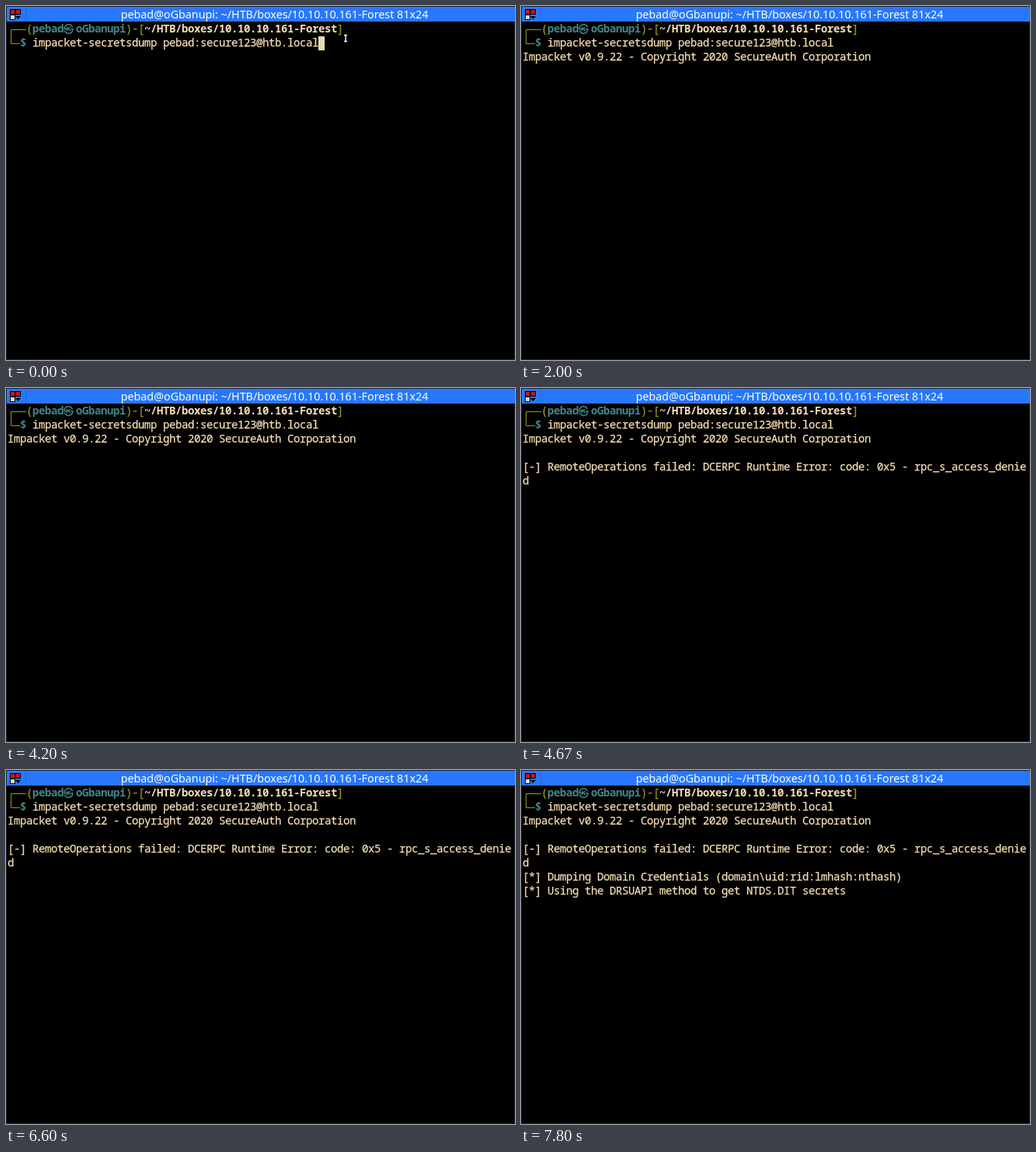
These frames come from a looping animation (655x455 px, 8000 ms). An HTML page:

```html
<!DOCTYPE html>
<html lang="en">
<head>
<meta charset="utf-8">
<title>Terminal session</title>
<style>
  html, body { margin: 0; width: 100%; height: 100%; overflow: hidden; background: #000; }
  svg { display: block; }
  text { white-space: pre; }
  .term {
    font: 500 14px "Noto Sans Mono", "DejaVu Sans Mono", monospace;
    letter-spacing: -.4px;
    color: #f6deb0;
  }
  .term text { fill: currentColor; stroke: currentColor; stroke-width: .25px; }
  .term .bold { font-weight: 700; stroke: none; }
  .term .green { color: #98971a; }
  .term .blue { color: #458588; }
  .term .mark { font: 700 13px "Noto Sans CJK KR", "Noto Sans CJK JP", "Noto Sans CJK", sans-serif; }
  .title { font: 14.3px "Noto Sans", "Open Sans", sans-serif; fill: #fff; text-anchor: middle; }
</style>
</head>
<body>
<svg width="655" height="455">
  <rect x=".5" y=".5" width="654" height="454" fill="#000" stroke="#24242c"/>
  <rect x="1" y="1" width="654" height="19" fill="#2777ff"/>
  <rect x="25" y="1" width="1" height="19" fill="#2068e0"/>
  <g id="groupButton">
    <path d="M5 4h14v7h-7v7h-7z" fill="#000"/>
    <path d="M6 5h5v5h-5zM13 5h5v5h-5z" fill="#d01414"/>
    <path d="M6 12h5v5h-5z" fill="#d8d8d8"/>
    <path d="M12 13h7l-3.5 4z" fill="#000"/>
  </g>
  <text class="title" id="title" x="345.5" y="16"></text>
  <path d="M26 30.5H6.5V48.5H18" fill="none" stroke="#98971a"/>
  <g class="term" id="screen"></g>
  <rect id="cursor" width="8" height="18" fill="#ebdbb2"/>
  <g id="pointer" fill="none">
    <path d="M434.5 37.5h5M437 37.5v8M434.5 45.5h5" stroke="#000" stroke-width="3"/>
    <path d="M435 37.5h4M437 37.5v8M435 45.5h4" stroke="#fff" stroke-width="1.4"/>
  </g>
</svg>
<script>
const LOOP = 8000, BLINK = 600, ENTER = 1200, POINTER_HIDES = 1130;
const CELL_W = 8, CELL_H = 18, LEFT = 2, TOP = 21, BASELINE = 13;
const user = "pebad", host = "oGbanupi", path = "~/HTB/boxes/10.10.10.161-Forest";
const $ = id => document.getElementById(id);
const colX = col => LEFT + col * CELL_W;
const rowY = row => TOP + row * CELL_H;

function print(row, col, string, style = "") {
  const text = document.createElementNS("http://www.w3.org/2000/svg", "text");
  text.setAttribute("x", colX(col));
  text.setAttribute("y", rowY(row) + BASELINE);
  text.setAttribute("class", style);
  text.textContent = string;
  $("screen").append(text);
  return text;
}

$("title").textContent = `${user}@${host}: ${path} 81x24`;

print(0, 3, "(", "green");
print(0, 4, user, "blue bold");
print(0, 9, "㉿", "blue mark");
print(0, 11, host, "blue bold");
print(0, 19, ")-[", "green");
print(0, 22, path, "bold");
print(0, 53, "]", "green");
print(1, 2, "$", "blue bold");
print(1, 4, `impacket-secretsdump ${user}:secure123@htb.local`);

// [time it appears, row, text]
const output = [
  [2000, 2, "Impacket v0.9.22 - Copyright 2020 SecureAuth Corporation"],
  [4670, 4, "[-] RemoteOperations failed: DCERPC Runtime Error: code: 0x5 - rpc_s_access_denie"],
  [4670, 5, "d"],
  [6870, 6, "[*] Dumping Domain Credentials (domain\\uid:rid:lmhash:nthash)"],
  [6870, 7, "[*] Using the DRSUAPI method to get NTDS.DIT secrets"],
].map(([time, row, string]) => ({ time, node: print(row, 0, string) }));

// [time, row, column] of each cursor stop
const cursorStops = [[0, 1, 50], [ENTER, 2, 0], [2000, 4, 0], [4670, 6, 0], [6870, 8, 0]];

const show = (node, visible) => node.setAttribute("visibility", visible ? "visible" : "hidden");

function draw(t) {
  for (const { time, node } of output) show(node, t >= time);
  const [, row, col] = cursorStops.filter(([time]) => t >= time).pop();
  $("cursor").setAttribute("x", colX(col));
  $("cursor").setAttribute("y", rowY(row));
  show($("cursor"), t < ENTER || Math.floor(t / BLINK) % 2 === 0);
  show($("pointer"), t < POINTER_HIDES);
}

const start = performance.now();
function frame() {
  draw((performance.now() - start) % LOOP);
  requestAnimationFrame(frame);
}
frame();
</script>
</body>
</html>
```
